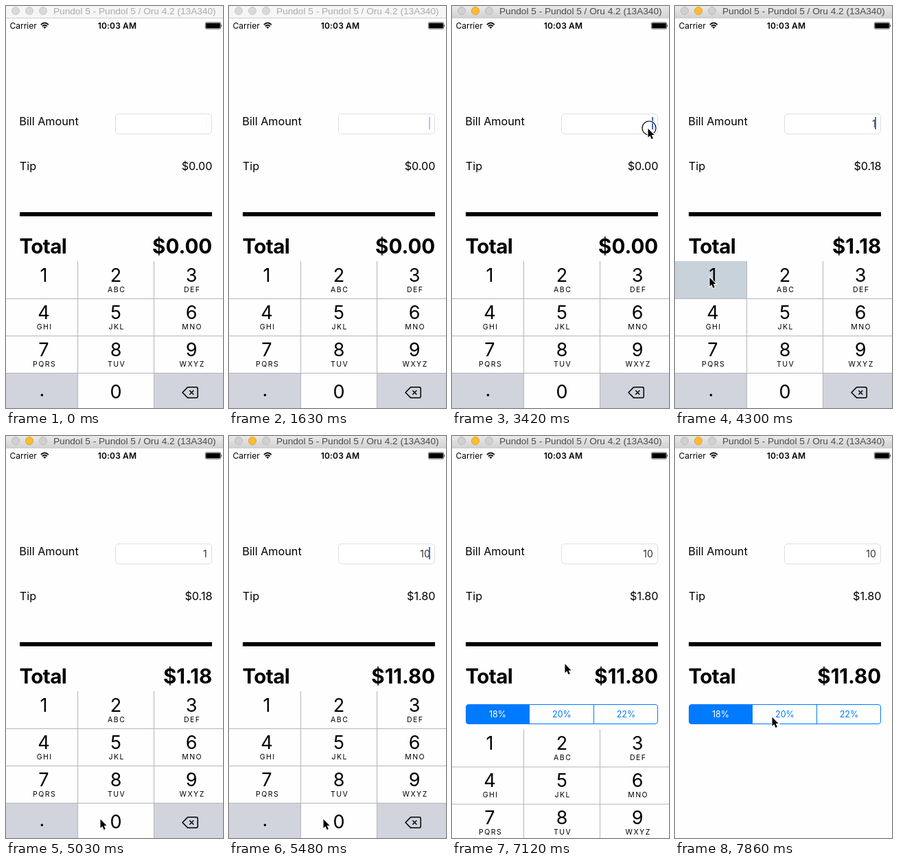
An HTML page that plays this animation: 316 px wide and 583 px high, repeating every 8000 ms.

```html
<!DOCTYPE html>
<html lang="en">
<head>
<meta charset="utf-8">
<title>Tip calculator</title>
<style>
  html, body { margin: 0; width: 100%; height: 100%; overflow: hidden; background: #fefefe; }
  svg { display: block; width: 316px; height: 583px; font-family: Inter, sans-serif; }
  .end { text-anchor: end; }
  .mid { text-anchor: middle; }
  .label { font-size: 16.2px; }
  .total { font-size: 29.5px; font-weight: 700; }
  .title { font: 13.65px "Liberation Sans", Arial, sans-serif; fill: #aaa; }
  .light { fill: #d9d9d9; stroke: #c9c9c9; }
  .active .title { fill: #4a4a4a; }
  .active .light { fill: #d0d0d0; stroke: #bbb; }
  .active .minimize { fill: #ffbd2e; stroke: #e0a028; }
  .bar { fill: #f6f6f6; }
  .active .bar { fill: url(#chrome); }
  .digit { font-size: 27px; }
  .letters { font-size: 10.5px; letter-spacing: 1.5px; }
  .segment { font-size: 12.5px; fill: #007aff; }
</style>
</head>
<body>
<svg viewBox="0 0 316 583">
  <defs>
    <linearGradient id="chrome" x2="0" y2="1">
      <stop stop-color="#e9e9e9"/><stop offset="1" stop-color="#d2d2d2"/>
    </linearGradient>
  </defs>
  <rect width="316" height="583" fill="#fefefe"/>

  <g id="window">
    <rect class="bar" width="316" height="17"/>
    <path d="M0 17.5H316" stroke="#cfcfcf"/>
    <circle class="light" cx="14" cy="7" r="5.5"/>
    <circle class="light minimize" cx="34" cy="7" r="5.5"/>
    <circle class="light" cx="54" cy="7" r="5.5"/>
    <text class="title" x="69" y="12">Pundol 5 - Pundol 5 / Oru 4.2 (13A340)</text>
  </g>

  <g font-size="12">
    <text x="5.5" y="32.5">Carrier</text>
    <text class="mid" x="162" y="32.5" font-weight="600" letter-spacing=".15">10:03 AM</text>
  </g>
  <g fill="none" stroke="#000" stroke-width="1.7">
    <path d="M50.8 27.2Q56.3 21.6 61.8 27.2M52.8 29.4Q56.3 25.8 59.8 29.4"/>
    <path d="M54.3 30.8Q56.3 28.8 58.3 30.8L56.3 33Z" fill="#000" stroke="none"/>
  </g>
  <rect x="290.3" y="23.8" width="22.4" height="9.4" rx="1.8" fill="none" stroke="#000" stroke-width=".6"/>
  <rect x="291.2" y="24.7" width="20.6" height="7.6" rx="1"/>
  <path d="M313.3 26.5q1.7 2 0 4z"/>

  <text class="label" x="19.3" y="172.5">Bill Amount</text>
  <rect x="159.5" y="156.5" width="140" height="29" rx="4.5" fill="#fff" stroke="#dedede"/>
  <text id="bill" class="end" x="292.8" y="176" font-size="14" fill="#333"></text>
  <rect id="caret" x="291" y="161" width="2" height="18" fill="#4169e8"/>
  <text class="label" x="19.8" y="237.5">Tip</text>
  <text id="tip" class="label end" x="300.5" y="237.5"></text>
  <rect x="20" y="299" width="280" height="6"/>
  <text class="total" x="19.5" y="359" letter-spacing="-.6">Total</text>
  <text id="total" class="total end" x="300.2" y="359"></text>

  <rect x="20.5" y="389.5" width="279" height="28" rx="3.5" fill="#fefefe" stroke="#007aff"/>
  <path d="M113 389.5H24a3.5 3.5 0 0 0 -3.5 3.5V414a3.5 3.5 0 0 0 3.5 3.5H113Z" fill="#007aff"/>
  <path d="M206.5 389.5V417.5" stroke="#007aff"/>
  <text class="segment mid" x="66.5" y="408" style="fill:#fff">18%</text>
  <text class="segment mid" x="160" y="408">20%</text>
  <text class="segment mid" x="253.5" y="408">22%</text>

  <g id="keyboard">
    <rect y="370" width="316" height="213" fill="#fefefe"/>
    <path d="M0 532H104V583H0ZM216 532H316V583H216Z" fill="#d1d4dc"/>
    <rect id="press1" y="370" width="104" height="54" fill="#c8d2da"/>
    <rect id="press0" x="105" y="533" width="110" height="50" fill="#c8d2da"/>
    <path d="M0 424.5H316M0 478.5H316M0 532.5H316M104.5 370V583M215.5 370V583" stroke="#b4b5b8"/>
    <g id="keys"></g>
    <g fill="none" stroke="#000" stroke-width="1.5" stroke-linejoin="round">
      <path d="M257 560.5L264 553.4Q264.7 552.7 266 552.7H277Q279.2 552.7 279.2 555V566Q279.2 568.3 277 568.3H266Q264.7 568.3 264 567.6Z"/>
      <path d="M267.3 557.5l6 6m0-6l-6 6"/>
    </g>
  </g>

  <g id="pointer">
    <g id="ring" fill="none">
      <circle cx="2" r="10" stroke="#fff" stroke-width="2.6"/>
      <circle cx="2" r="10" stroke="#000" stroke-width="1.2"/>
    </g>
    <path d="M.5 .8V13.6L3.4 10.9 5.6 16 7.8 15 5.7 10.1H9.6Z" stroke="#fff" stroke-width="2" paint-order="stroke"/>
  </g>
</svg>
<script>
const LOOP = 8000, TICKS = 54;
const byId = id => document.getElementById(id);
const show = (id, visible) => byId(id).setAttribute("visibility", visible ? "visible" : "hidden");
const move = (id, x, y) => byId(id).setAttribute("transform", `translate(${x} ${y})`);

const ENTER = 17, FOCUS = 23, KEY_ONE = 28, KEY_ZERO = 35, DISMISS = 47;

// Pointer stops: tick, x, y
const STOPS = [
  [16, 322, 500], [17, 311, 487], [22, 285, 177], [24, 285, 177],
  [28, 50, 393], [30, 50, 393], [32, 118, 540], [34, 137, 555],
  [42, 137, 555], [46, 172, 307], [47, 172, 307], [50, 141, 395],
  [51, 141.5, 407], [52, 141.5, 407], [53, 141, 407]
];

const ease = u => u * u * (3 - 2 * u);

function buildKeys() {
  const letters = ["", "ABC", "DEF", "GHI", "JKL", "MNO", "PQRS", "TUV", "WXYZ"];
  const columns = [55, 160, 270];
  const digit = (x, y, s) => `<text class="digit mid" x="${x}" y="${y}">${s}</text>`;
  byId("keys").innerHTML = letters.map((group, i) => {
    const x = columns[i % 3], y = 400 + 54 * Math.floor(i / 3);
    return digit(x, y, i + 1) +
      `<text class="letters mid" x="${x + 1.2}" y="${y + 15}">${group}</text>`;
  }).join("") + digit(160, 569, 0) + digit(52.5, 566, ".");
}

function pointerAt(tick) {
  const i = Math.max(1, STOPS.findIndex(stop => stop[0] >= tick));
  const [t0, x0, y0] = STOPS[i - 1], [t1, x1, y1] = STOPS[i];
  const u = ease(Math.max(0, (tick - t0) / (t1 - t0)));
  return [x0 + (x1 - x0) * u, y0 + (y1 - y0) * u];
}

// The caret stays solid for a moment after each input, then blinks.
function caretOpacity(tick) {
  if (tick > DISMISS) return 0;
  const blink = [1, 1, 0.03, 0, 0, 0, 0.4];
  const input = [KEY_ZERO, KEY_ONE, FOCUS].find(start => tick >= start);
  if (input === undefined) return blink[(tick + 2) % 7];
  return blink[Math.max(0, tick - input - 3) % 7];
}

function draw(tick) {
  const bill = tick >= KEY_ZERO ? "10" : tick >= KEY_ONE ? "1" : "";
  byId("bill").textContent = bill;
  byId("tip").textContent = "$" + (bill * 0.18).toFixed(2);
  byId("total").textContent = "$" + (bill * 1.18).toFixed(2);
  byId("window").setAttribute("class", tick >= FOCUS ? "active" : "");
  byId("caret").setAttribute("opacity", caretOpacity(tick));

  show("press1", tick === KEY_ONE || tick === KEY_ONE + 1);
  show("press0", tick === KEY_ZERO || tick === KEY_ZERO + 1);
  show("ring", [FOCUS, KEY_ONE, KEY_ZERO, DISMISS].includes(tick));
  show("pointer", tick >= ENTER);
  move("pointer", ...pointerAt(tick));

  const slide = Math.min(1, Math.max(0, (tick - DISMISS) / 3));
  move("keyboard", 0, 214 * ease(slide));
}

function play(now) {
  // The small offset absorbs rounding of the recording's frame times.
  draw(Math.floor((now % LOOP) / LOOP * TICKS + 0.1) % TICKS);
  requestAnimationFrame(play);
}

buildKeys();
draw(0);
requestAnimationFrame(play);
</script>
</body>
</html>
```
